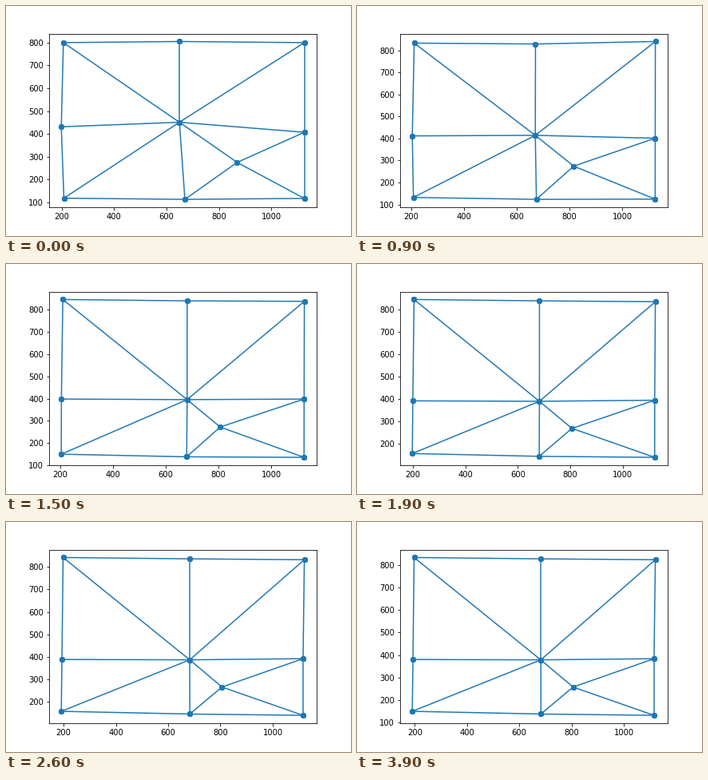
Write a matplotlib script that moves like this. It is 432x288 px and loops after 4000 ms.

```python
import numpy as np
import matplotlib.pyplot as plt
from matplotlib.animation import FuncAnimation

FRAMES, INTERVAL = 40, 100
PAUSE = 12   # the mesh rests for one frame here
FALL = 0.6   # steady downward drift per step

# Each node: start point, settled point, settling time in steps
NODES = dict(
    a=((207, 800), (197.5, 857), 8.5),
    b=((649, 805), (682.5, 851), 8.8),
    c=((1125, 800), (1121, 847), 5),
    d=((199, 431), (193, 403), 10.5),
    e=((649, 451), (682.5, 401.5), 9),
    f=((1125, 407), (1116, 406.5), 9),
    g=((869, 275), (806, 280.5), 7),
    h=((209, 118), (190.5, 172.5), 12.5),
    i=((670, 113), (683, 160.5), 13),
    j=((1125, 117), (1116, 154.5), 12.8),
)
EDGES = "ab bc ad dh ae be ce de ef cf fj eg gf gj gi ei eh hi ij".split()

# Outer nodes first settle this far to the right, then slide back
SLIDE = dict(adh=15, fj=10, c=5)
SLIDE_TIME = 19.5


def remaining(step, time, power):
    """Part of a move still to come: 1 at the start, falling to 0."""
    return np.exp(-(step / time) ** power)


def place(name, step):
    start, rest, time = NODES[name]
    slide = sum(dx for group, dx in SLIDE.items() if name in group)
    goal = np.add(rest, (slide, 0))
    pos = goal + np.subtract(start, goal) * remaining(step, time, 2.5)
    pos[0] -= slide * (1 - remaining(step, SLIDE_TIME, 5))
    pos[1] -= FALL * step
    return pos


fig, ax = plt.subplots(figsize=(6, 4), dpi=72)
fig.subplots_adjust(bottom=0.125)
lines = [ax.plot([], [], "o-", color="C0")[0] for _ in EDGES]


def draw(frame):
    step = frame - (frame >= PAUSE)
    mesh = {name: place(name, step) for name in NODES}
    for line, (p, q) in zip(lines, EDGES):
        line.set_data(*zip(mesh[p], mesh[q]))
    ax.relim()
    ax.autoscale_view()
    return lines


anim = FuncAnimation(fig, draw, frames=FRAMES, interval=INTERVAL,
                     init_func=lambda: draw(0), repeat=True, repeat_delay=0)
plt.show()
```
